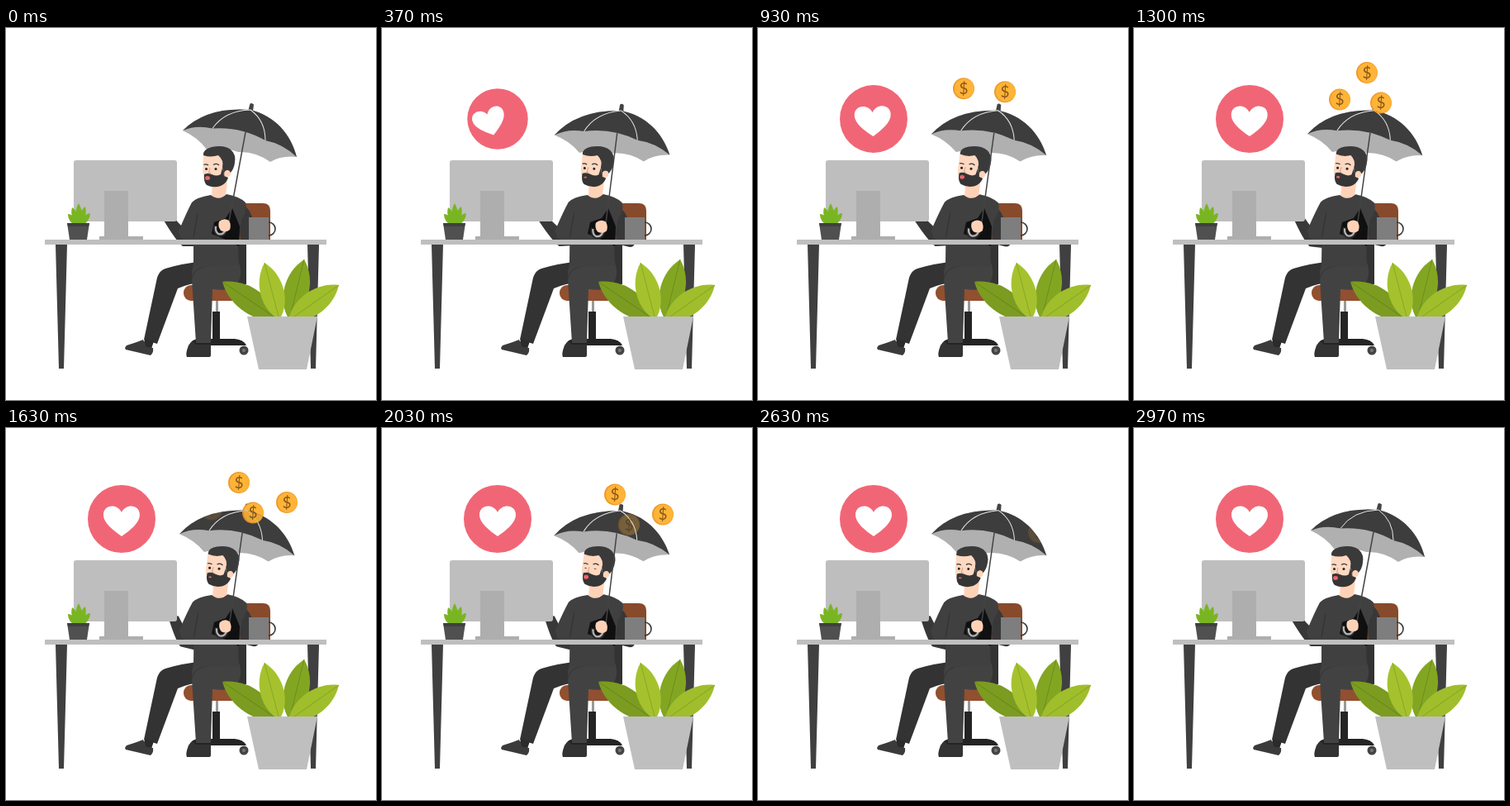
Animation of 448 by 450 pixels, one loop 3.01 s. Source, as an HTML page:

```html
<!DOCTYPE html>
<html lang="en">
<head>
<meta charset="utf-8">
<title>Desk and umbrella</title>
<style>
html, body { margin: 0; height: 100%; overflow: hidden; background: #fff; }
svg { display: block; width: 448px; height: 450px; }
text { font: 19px Lato, sans-serif; text-anchor: middle; fill: #8c571b; }
</style>
</head>
<body>
<svg viewBox="0 0 448 450">
  <defs>
    <path id="shade" d="M214 124Q243 95 296 99C325 106 345 128 352 156Q334 154 320 162Q302 149 281 150Q262 143 243 147Q232 132 214 124Z"/>
    <clipPath id="cover"><use href="#shade" class="umbrella"/></clipPath>
    <g id="coin">
      <circle r="13" fill="#ef9a2b"/>
      <circle cx=".8" r="11.8" fill="#ffb437"/>
      <text y="6.7">$</text>
    </g>
  </defs>

  <!-- chair -->
  <path fill="#874a2b" d="M281 212H311Q320 212 320 221V258H281Z"/>
  <path fill="#333" d="M280 258H291V310H280Z"/>
  <rect x="215" y="311" width="85" height="19" rx="9" fill="#91502f"/>
  <path fill="#999" d="M254 330h3v16h-3z"/>
  <path fill="#242424" d="M250 343H259V376H277Q288 377 291 384H222Q224 377 232 376H250Z"/>
  <circle cx="288" cy="390" r="5.5" fill="#444"/>
  <circle cx="288" cy="390" r="2" fill="#777"/>

  <!-- table legs -->
  <path fill="#404040" d="M60 262H74L70 412H64ZM365 262H379L375 412H369Z"/>

  <!-- trousers and shoes -->
  <path fill="#333" d="M240 282Q212 285 193 291Q186 293 183 302L167 377L183 382L208 315Q222 309 236 308Z"/>
  <path fill="#2b2b2b" d="M168 376L179 379L176 388L166 386Z"/>
  <path fill="#3b3b3b" d="M166 377Q159 380 146 384Q143 387 145 389L175 396Q179 393 178 387L170 386Z"/>
  <path fill="#424242" d="M228 283H282Q288 303 276 315Q266 318 250 316L248 381H230L225 304Q224 294 228 283Z"/>
  <path fill="none" stroke="#333" d="M225 303Q226 293 240 288L267 286"/>
  <path fill="#333" d="M221 384Q226 376 229 383H248V396Q248 398 246 398H219Q217 394 221 384Z"/>

  <g class="umbrella"><path fill="#444" d="M293 101L295.500 91.500Q297.500 90 300 92.500L299 101Z"/></g>
  <g id="outer"></g>
  <g class="umbrella">
    <use href="#shade" fill="#b0b0b0"/>
    <path fill="#3d3d3d" d="M214 124Q243 95 296 99C325 106 345 128 352 156Q335 140 314 136Q284 119 250 121.500Q230 117 214 124Z"/>
    <path fill="none" stroke="#e6e6e6" d="M250 121.500Q265 100 296 99Q314 112 314 136"/>
  </g>
  <g clip-path="url(#cover)"><g id="inner"></g></g>

  <!-- man -->
  <g id="arm"><path fill="#383838" d="M190 231L203 229Q208 235 213 240L232 245V264H214Q206 258 190 231Z"/></g>
  <path id="elbow" fill="#383838" d="M280 210Q292 214 297 226L306 256Q306 262 300 262L284 258Z"/>
  <g id="body">
    <path fill="#ffd2b8" d="M250 185H268L266 203Q258 211 249 203Z"/>
    <path fill="#404040" d="M248 202Q258 210 267 201Q283 204 290 211Q293 220 285 232L281 265L282 287Q252 290 227 288V259L212 255L209 246Q219 222 225 211Q230 205 248 202Z"/>
    <path fill="none" stroke="#303030" d="M232 224L227 254"/>
  </g>
  <g id="head">
    <path fill="#ffd8c1" d="M239 152L238 174L241 186L260 190L270 179L272 165L264 150Z"/>
    <path fill="#3a3a3a" d="M239 154Q238 147 249 144Q264 141 272 147Q279 153 277 163Q276 171 271 176Q270 170 266 173L264 180L262 168Q264 160 257 154Q248 157 239 154Z"/>
    <path fill="#353535" d="M262 169L264 179L269 181Q267 188 260 191Q251 194 243 190Q239 186 240 177Q244 175 249 177Q256 180 260 177Z"/>
    <circle cx="268" cy="176" r="3.800" fill="#ffd2b8"/>
    <path fill="none" stroke="#353535" stroke-width="1.300" d="M239.500 165.500Q242 164 245 166M251 165.500Q255 163 258 166"/>
    <path fill="none" stroke="#db9f86" d="M247 169L245.500 175L248 175.500"/>
    <g id="eyes" fill="#242424"><circle cx="242.500" r="1.500"/><circle cx="254" r="1.500"/></g>
    <ellipse id="mouth" cx="244" cy="181.500" rx="3" ry="2.500" fill="#f0626b"/>
  </g>
  <path fill="#101010" d="M274 218L283 240L282 264L266 256L249 249L252 235L266 230Z"/>
  <g class="umbrella" fill="none">
    <path stroke="#444" stroke-width="1.500" d="M290 126L270 234"/>
    <path stroke="#282828" stroke-width="5" d="M268 236L266 245Q263 252 256 249Q252 246 254 239"/>
    <path stroke="#b5b5b5" stroke-width="2.200" d="M266 244Q263 251 257 249Q253 246 254 240"/>
  </g>
  <path id="hand" fill="#ffd2b8" d="M258 234Q264 229 270 233Q273 238 271 244Q266 248 260 245Q256 240 258 234Z"/>

  <!-- table -->
  <path fill="#bfbfbf" d="M47 256H388V262H47Z"/>
  <rect x="82" y="160" width="125" height="74" rx="3" fill="#bebebe"/>
  <path fill="#aeaeae" d="M119 197H148V252H166V256H113V252H119Z"/>
  <circle cx="318" cy="243" r="8" fill="none" stroke="#383838" stroke-width="1.600"/>
  <path fill="#7e7e7e" d="M294 229H318V256H294Z"/>
  <g id="sprout"></g>
  <path fill="#505050" d="M74 236H101L98 256H77Z"/>
  <path fill="#404040" d="M74 236H101L100 240H75Z"/>
  <g id="plant"></g>
  <path fill="#bfbfbf" d="M292 349H377L364 413H306Z"/>

  <!-- heart badge -->
  <g id="badge">
    <circle r="41" fill="#f16676"/>
    <path id="heart" fill="#fff" d="M0 19C-10 12 -22 3 -22 -7C-22 -20 -5 -21 0 -10C5 -21 22 -20 22 -7C22 3 10 12 0 19Z"/>
  </g>
</svg>
<script>
const LOOP = 3010;
const $ = id => document.getElementById(id);
const move = (id, value) => $(id).setAttribute('transform', value);
const clamp = v => Math.max(0, Math.min(1, v));

function leaf(parent, x, y, tipX, tipY, width, color, rib) {
  const dx = tipX - x, dy = tipY - y, len = Math.hypot(dx, dy);
  const nx = -dy / len * width, ny = dx / len * width;
  const edge = s => [.25, .72].map(k => [x + dx * k + nx * s, y + dy * k + ny * s]);
  const [a, b] = edge(1), [c, d] = edge(-1);
  $(parent).innerHTML += `<path fill="${color}" d="M${x} ${y}C${a} ${b} ${tipX} ${tipY}C${d} ${c} ${x} ${y}"/>` +
    (rib ? `<path stroke="${rib}" stroke-width=".8" d="M${x} ${y}L${tipX} ${tipY}"/>` : '');
}

leaf('plant', 330, 353, 262, 307, 20, '#7b9c20', '#5f8018');
leaf('plant', 343, 353, 361, 280, 20, '#83a622', '#658718');
leaf('plant', 342, 354, 403, 311, 19, '#a0bd2c', '#7e9b20');
leaf('plant', 331, 353, 313, 284, 19, '#a5c22e', '#83a022');
for (const [x, y] of [[75, 225], [80, 217], [88, 212], [96, 216], [102, 224]])
  leaf('sprout', 88, 240, x, y, 5, '#79b522');

// x, y at time 0, first visible, end of fade
const coins = [[249, 39.5, 525, 1730], [299, 43.5, 800, 2230], [282, 7, 1240, 2580], [340, 31, 1400, 2730]];
for (const id of ['outer', 'inner'])
  $(id).innerHTML = coins.map(() => '<use href="#coin"/>').join('');

const times = [0, 370, 930, 1630, 2030, 2630, 2970, LOOP];
const tilts = [0, 1, .8, .75, 1.1, .75, 0, 0];
const nods = [0, .7, 1, 1, 1, .2, 0, 0];
const lifts = [0, -.2, -.2, 1, 1, 1, 0, 0];

function pose(values, t) {
  const i = times.findIndex(v => v > t);
  const k = (t - times[i - 1]) / (times[i] - times[i - 1]);
  return values[i - 1] + (values[i] - values[i - 1]) * k * k * (3 - 2 * k);
}

function draw(now) {
  const t = now % LOOP;
  const tilt = pose(tilts, t), nod = pose(nods, t), lift = pose(lifts, t);

  for (const el of document.querySelectorAll('.umbrella'))
    el.setAttribute('transform', `translate(${-5 * tilt} ${1.5 * tilt}) rotate(${-3.3 * tilt} 285 130)`);
  move('hand', `translate(${tilt} ${1.5 * tilt})`);
  move('elbow', `translate(0 ${3 * tilt})`);
  move('arm', `rotate(${14 * lift} 212 252)`);
  move('body', `rotate(${.8 * nod} 255 285)`);
  move('head', `translate(${1.5 * nod} 0) rotate(${5 * nod} 258 200)`);

  const blink = t > 1950 && t < 2110;
  move('eyes', `translate(0 170.5) scale(1 ${blink ? .25 : 1})`);
  const open = .5 + .5 * Math.cos(t / LOOP * 6 * Math.PI);
  $('mouth').setAttribute('ry', .6 + 1.9 * open);
  $('mouth').setAttribute('rx', 1.7 + 1.3 * open);

  // badge pops up while the heart slides upright
  const grow = t < 100 ? 0 : 1 - Math.exp((100 - t) / 120);
  const slip = Math.exp((370 - t) / 240);
  move('badge', `translate(140 110) scale(${grow})`);
  move('heart', `translate(${-11 * slip} ${2 + 1.5 * slip}) rotate(${-17 * slip})`);

  // faint coins show only against the umbrella
  coins.forEach(([x, y, from, end], i) => {
    const alpha = t < from ? 0 : clamp((end - t) / 670);
    const place = `translate(${x} ${y + .0362 * t})`;
    const back = $('outer').children[i], front = $('inner').children[i];
    back.setAttribute('transform', place);
    front.setAttribute('transform', place);
    back.setAttribute('opacity', alpha < .5 ? 0 : 1);
    front.setAttribute('opacity', alpha);
  });
}

const start = performance.now();
function tick() {
  draw(performance.now() - start);
  requestAnimationFrame(tick);
}
tick();
</script>
</body>
</html>
```
